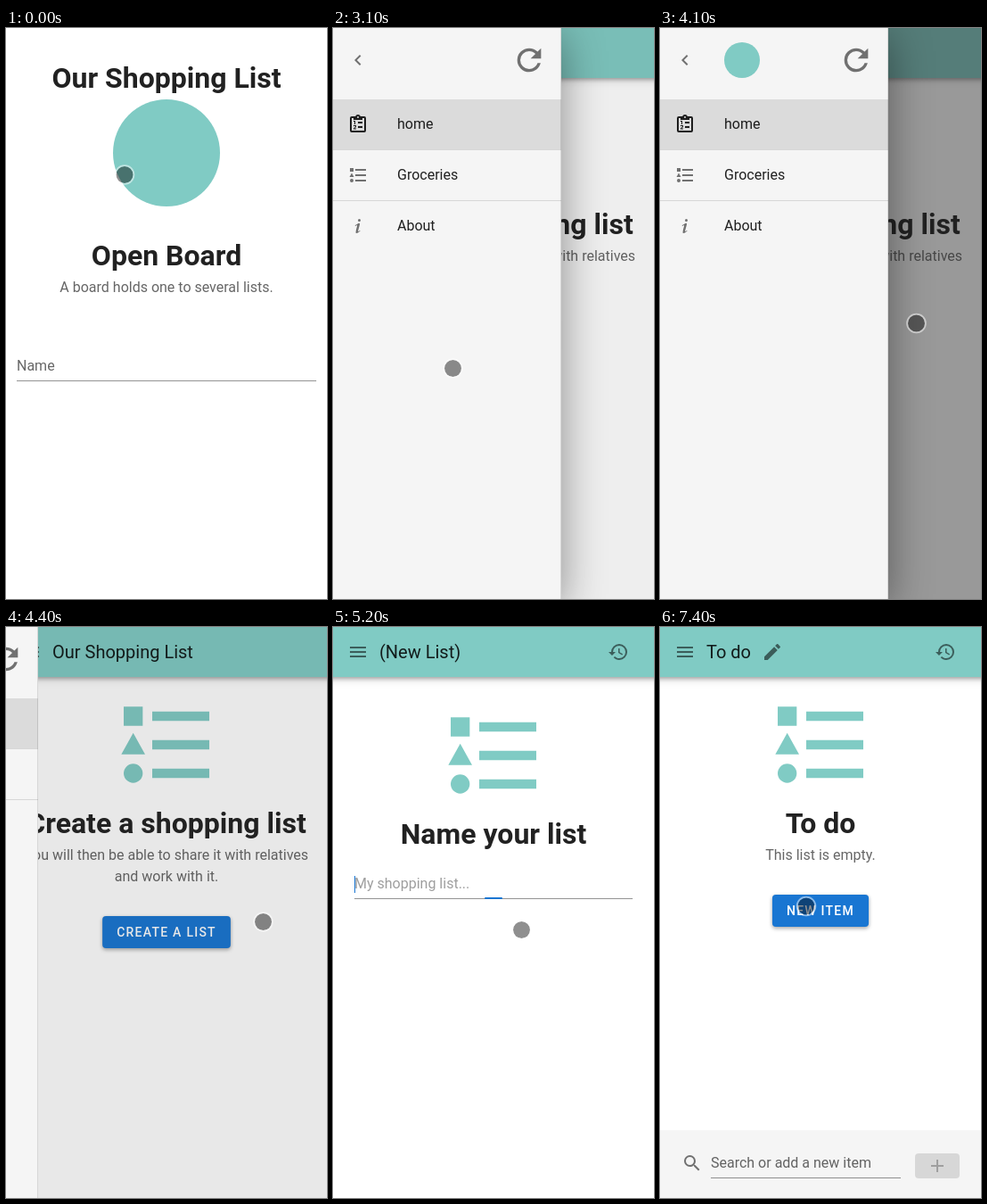
Write an HTML page that moves like this. It is 360 px wide and 640 px high and loops after 8000 ms.

```html
<!DOCTYPE html>
<html lang="en">
<head>
<meta charset="utf-8">
<title>Our Shopping List</title>
<style>
  html, body { margin: 0; width: 100%; height: 100%; overflow: hidden; background: #fff; }
  svg { display: block; }
  text { font: 16px Roboto, sans-serif; fill: rgba(0,0,0,.87); white-space: pre; }
  .h1 { font-size: 32px; font-weight: 700; }
  .bar { font-size: 20px; }
  .soft { fill: rgba(0,0,0,.6); }
  .hint { fill: rgba(0,0,0,.38); }
  .label { font-weight: 500; font-size: 14px; letter-spacing: 1.25px; fill: #fff; }
  .mid { text-anchor: middle; }
  .button { filter: drop-shadow(0 2px 2px rgba(0,0,0,.25)) drop-shadow(0 1px 2px rgba(0,0,0,.12)); }
  .appbar { filter: drop-shadow(0 2px 2px rgba(0,0,0,.25)) drop-shadow(0 2px 5px rgba(0,0,0,.18)); }
  .raised { filter: drop-shadow(0 10px 24px rgba(0,0,0,.42)); }
</style>
</head>
<body>
<svg id="stage" width="360" height="640" viewBox="0 0 360 640"></svg>
<script>
const LOOP = 8000, TEAL = '#80cbc4', BLUE = '#1976d2', GREY = 'rgba(0,0,0,.54)', LINE = 'rgba(0,0,0,.42)';
const stage = document.getElementById('stage');
const ctx = document.createElement('canvas').getContext('2d');

// 24 x 24 icon outlines
const ICONS = {
  back: 'M15.41 16.58L10.83 12L15.41 7.41L14 6L8 12L14 18Z',
  refresh: 'M17.65 6.35C16.2 4.9 14.21 4 12 4A8 8 0 0 0 12 20C15.73 20 18.84 17.45 19.73 14H17.65C16.83 16.33 14.61 18 12 18A6 6 0 0 1 12 6C13.66 6 15.14 6.69 16.22 7.78L13 11H20V4Z',
  board: 'M19 3H14.82C14.4 1.84 13.3 1 12 1S9.6 1.84 9.18 3H5A2 2 0 0 0 3 5V19A2 2 0 0 0 5 21H19A2 2 0 0 0 21 19V5A2 2 0 0 0 19 3M12 3A1 1 0 1 1 12 5A1 1 0 0 1 12 3M5 5H7V7H17V5H19V19H5ZM12 9H17V11H12ZM12 14H17V16H12ZM7 8H9V12H8V9H7ZM7 13H10V15L8 16.5H10V17.5H7V16.5L9 14.7V14H7Z',
  list: 'M5 9.5L7.5 14H2.5ZM3 4H7V8H3ZM5 20A2 2 0 0 0 5 16A2 2 0 0 0 5 20M9 5V7H21V5ZM9 19H21V17H9ZM9 13H21V11H9Z',
  info: 'M13.5 4A1.5 1.5 0 0 0 13.5 7A1.5 1.5 0 0 0 13.5 4M13.1 8.8C12 8.9 8.7 11.5 8.7 11.5L9 12L10.1 11.4C12.2 10 10.5 13.1 9.6 18.4C9.2 21 11.6 19.7 12.2 19.3L14.6 17.6L14.2 17.1C13.5 17.5 12.4 18.5 12.2 17.9C12 17.3 13.2 13.4 13.9 10.7C14 10 14.3 8.7 13.1 8.8Z',
  menu: 'M3 6H21V8H3ZM3 11H21V13H3ZM3 16H21V18H3Z',
  history: 'M13.5 8H12V13L16.28 15.54L17 14.33L13.5 12.25ZM13 3A9 9 0 0 0 4 12H1L4.96 16.03L9 12H6A7 7 0 1 1 13 19C11.07 19 9.32 18.21 8.06 16.94L6.64 18.36C8.27 20 10.5 21 13 21A9 9 0 0 0 13 3',
  pencil: 'M20.71 7.04C21.1 6.65 21.1 6 20.71 5.63L18.37 3.29C18 2.9 17.35 2.9 16.96 3.29L15.12 5.12L18.87 8.87ZM3 17.25V21H6.75L17.81 9.93L14.06 6.18Z',
  search: 'M9.5 3A6.5 6.5 0 0 1 16 9.5C16 11.11 15.41 12.59 14.44 13.73L14.71 14H15.5L20.5 19L19 20.5L14 15.5V14.71L13.73 14.44C12.59 15.41 11.11 16 9.5 16A6.5 6.5 0 0 1 9.5 3M9.5 5A4.5 4.5 0 0 0 9.5 14A4.5 4.5 0 0 0 9.5 5Z',
  plus: 'M19 13H13V19H11V13H5V11H11V5H13V11H19Z'
};

const clamp = v => Math.min(1, Math.max(0, v));

function bezier(x1, y1, x2, y2) {
  const at = (s, a, b) => 3 * (1 - s) ** 2 * s * a + 3 * (1 - s) * s * s * b + s ** 3;
  return v => {
    let lo = 0, hi = 1;
    for (let i = 0; i < 24; i++) {
      const mid = (lo + hi) / 2;
      if (at(mid, x1, x2) < v) lo = mid; else hi = mid;
    }
    return at(lo, y1, y2);
  };
}
const swift = bezier(.25, .8, .5, 1), standard = bezier(.4, 0, .2, 1);
const progress = (t, start, length, ease) => ease(clamp((t - start) / length));

const rect = (x, y, w, h, fill, extra = '') =>
  `<rect x="${x}" y="${y}" width="${w}" height="${h}" fill="${fill}" ${extra}/>`;
const disc = (x, y, r) => `<circle cx="${x}" cy="${y}" r="${r}" fill="${TEAL}"/>`;
const text = (x, y, s, cls = '') => `<text x="${x}" y="${y}" class="${cls}">${s}</text>`;
const icon = (name, x, y, size = 24, fill = GREY) =>
  `<path d="${ICONS[name]}" fill="${fill}" fill-rule="evenodd" transform="translate(${x} ${y}) scale(${size / 24})"/>`;

function width(s, font = '16px Roboto, sans-serif') {
  ctx.font = font;
  return ctx.measureText(s).width;
}

function button(label, y) {
  const w = width(label, '500 14px Roboto, sans-serif') + label.length * 1.25 + 32, x = 180 - w / 2;
  return rect(x, y, w, 36, BLUE, 'rx="4" class="button"') + text(x + 16, y + 23, label, 'label');
}

// Input line with a blinking caret; y is the top of the resting line
function field(t, x, y, w, typed, focusAt, keys) {
  let out = rect(x, y, w, 1, LINE);
  if (typed) out += text(x, y - 11, typed);
  if (t < focusAt) return out;
  const p = progress(t, focusAt, 300, swift);
  const last = Math.max(focusAt, ...keys.filter(k => k <= t));
  out += rect(x + w / 2 * (1 - p), y - 1, w * p, 2, BLUE);
  if ((t - last) % 1000 < 500) out += rect(x + Math.round(width(typed)), y - 25, 1, 19, BLUE);
  return out;
}

const typedAt = (t, word, keys) => word.slice(0, keys.filter(k => k <= t).length);

const BOARD_KEYS = [2285, 2385, 2585, 2685], LIST_KEYS = [6485, 6685, 6785, 6985, 7085];
const FOCUS = 1485, HOME = 3085, CLOSE = 4285, NAMING = 5195, DONE = 7385;

const appBar = title =>
  rect(-20, -20, 400, 76, TEAL, 'class="appbar"') + icon('menu', 16, 16) + text(52, 35, title, 'bar');

function boardPage(t) {
  const typed = typedAt(t, 'home', BOARD_KEYS), p = progress(t, FOCUS, 300, swift);
  return text(180, 67, 'Our Shopping List', 'h1 mid') + disc(180, 140, 60) +
    text(180, 266, 'Open Board', 'h1 mid') +
    text(180, 296, 'A board holds one to several lists.', 'soft mid') +
    `<g transform="translate(12 ${368 - 18 * p}) scale(${1 - p / 4})">
      <text y="16" style="fill:${t < FOCUS ? 'rgba(0,0,0,.6)' : BLUE}">Name</text></g>` +
    field(t, 12, 395, 336, typed, FOCUS, BOARD_KEYS) +
    (typed ? button('OPEN BOARD', 429) : '');
}

function drawer(t) {
  const x = -256 * progress(t, CLOSE, 200, standard);
  if (x <= -255.9) return '';
  return `<g transform="translate(${x} 0)">` +
    rect(0, 0, 256, 640, '#f5f5f5', t < CLOSE ? 'class="raised"' : '') +
    rect(0, 80, 256, 56, '#dbdbdb') +
    rect(0, 136, 256, 1, 'rgba(0,0,0,.12)') + rect(0, 193, 256, 1, 'rgba(0,0,0,.12)') +
    rect(255, 0, 1, 640, 'rgba(0,0,0,.12)') +
    icon('back', 16, 24) + (t > 3185 ? disc(92, 36, 20) : '') + icon('refresh', 200, 16, 40) +
    icon('board', 16, 96, 24, 'rgba(0,0,0,.87)') + text(72, 113, 'home') +
    icon('list', 16, 153) + text(72, 170, 'Groceries') +
    icon('info', 16, 210) + text(72, 227, 'About') + '</g>';
}

function homePage(t) {
  const shade = .46 * (progress(t, HOME, 300, swift) - progress(t, CLOSE, 300, swift));
  return appBar('Our Shopping List') + icon('list', 116, 68, 128, TEAL) +
    text(180, 231, 'Create a shopping list', 'h1 mid') +
    text(180, 261, 'You will then be able to share it with relatives', 'soft mid') +
    text(180, 285, 'and work with it.', 'soft mid') +
    button('CREATE A LIST', 324) +
    rect(0, 0, 360, 640, `rgba(33,33,33,${shade})`) + drawer(t);
}

function namingPage(t) {
  const typed = typedAt(t, 'To do', LIST_KEYS);
  return appBar(typed || '(New List)') + icon('history', 308, 16) +
    icon('list', 116, 80, 128, TEAL) + text(180, 243, 'Name your list', 'h1 mid') +
    (typed ? button('CREATE', 325) : text(24, 293, 'My shopping list...', 'hint')) +
    field(t, 24, 304, 312, typed, NAMING, LIST_KEYS);
}

function listPage() {
  return appBar('To do') + icon('pencil', 114, 16) + icon('history', 308, 16) +
    icon('list', 116, 68, 128, TEAL) + text(180, 231, 'To do', 'h1 mid') +
    text(180, 261, 'This list is empty.', 'soft mid') + button('NEW ITEM', 300) +
    rect(0, 564, 360, 76, '#f5f5f5') + icon('search', 24, 589) +
    text(57, 606, 'Search or add a new item', 'soft') + rect(57, 617, 213, 1, LINE) +
    rect(286, 590, 50, 28, 'rgba(0,0,0,.12)', 'rx="4"') + icon('plus', 299, 592, 24, 'rgba(0,0,0,.26)');
}

// Pointer stops: time, x, y
const STOPS = [
  [0, 133, 164.5], [350, 133, 164.5], [600, 151, 260], [900, 134.5, 381.5],
  [3700, 134.5, 381.5], [3900, 88, 32], [4100, 287.5, 331], [4400, 288.5, 330.5],
  [4500, 288.5, 330.5], [4900, 211.5, 339.5], [5250, 211.5, 339.5], [5700, 158, 300],
  [6150, 158, 300], [6300, 164, 313], [LOOP, 164, 313]
];

function pointer(t) {
  const i = STOPS.findIndex(s => s[0] > t), [t0, x0, y0] = STOPS[i - 1], [t1, x1, y1] = STOPS[i];
  const p = (t - t0) / (t1 - t0), at = `cx="${x0 + (x1 - x0) * p}" cy="${y0 + (y1 - y0) * p}"`;
  return `<circle ${at} r="9.5" fill="rgba(0,0,0,.44)"/>
    <circle ${at} r="10.4" fill="none" stroke="rgba(255,255,255,.5)" stroke-width="1.8"/>`;
}

function draw() {
  const t = performance.now() % LOOP;
  const page = t < HOME ? boardPage : t < NAMING ? homePage : t < DONE ? namingPage : listPage;
  stage.innerHTML = page(t) + pointer(t);
  requestAnimationFrame(draw);
}
draw();
</script>
</body>
</html>
```
